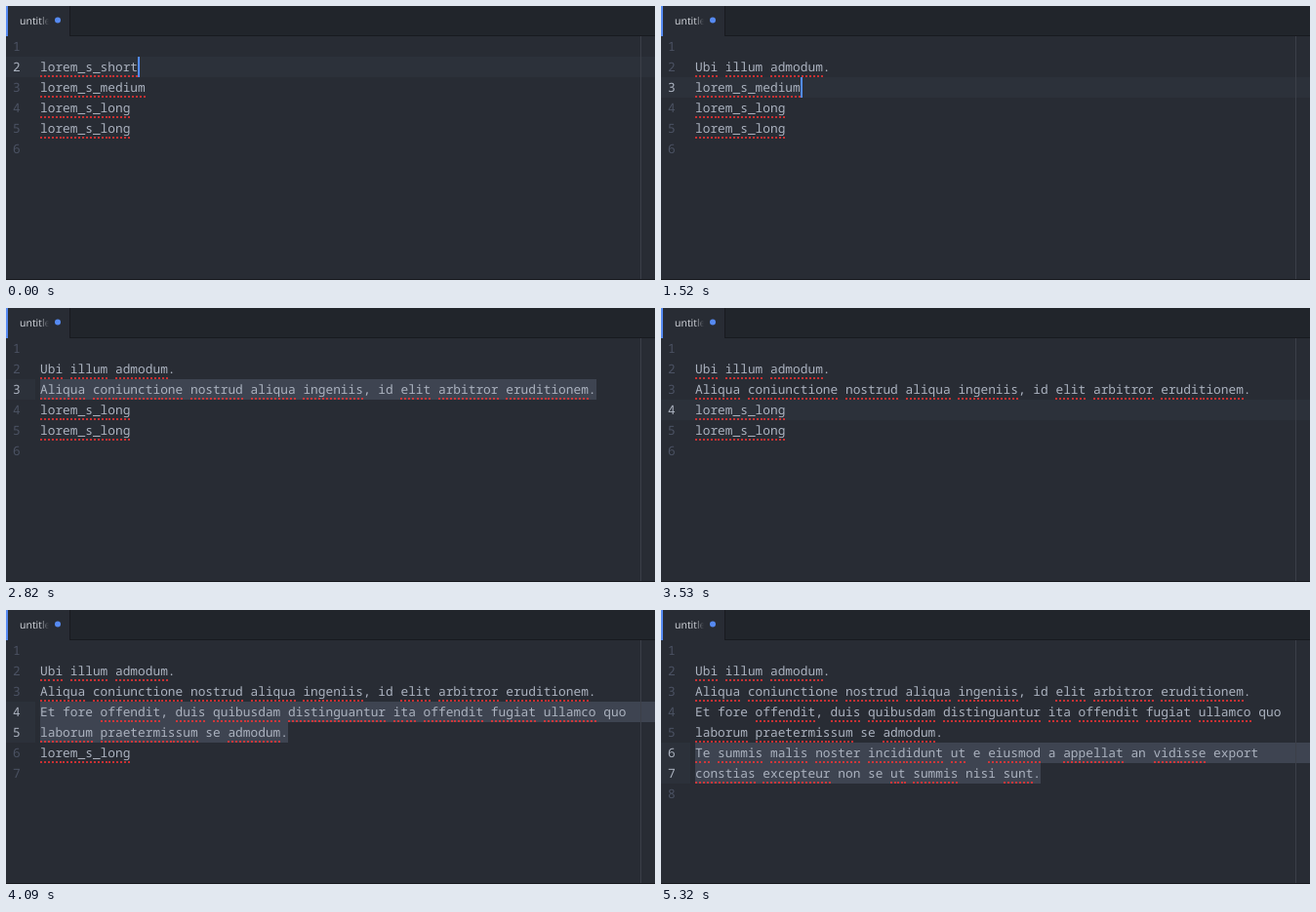
An HTML page with a canvas that plays this animation: 665x281 px, repeating every 7350 ms.

```html
<!DOCTYPE html>
<html lang="en">
<head>
<meta charset="utf-8">
<title>Snippet expansion</title>
<style>
  html, body { margin: 0; width: 100%; height: 100%; overflow: hidden; background: #282c34; }
  canvas { display: block; }
</style>
</head>
<body>
<canvas id="stage" width="665" height="281"></canvas>
<script>
const ctx = document.getElementById('stage').getContext('2d');
const W = 665, H = 281, LOOP = 7350;
const TEXT_X = 35, TOP = 31, ROW = 21, PITCH = 7.697;
const CODE_FONT = '12.83px "Noto Sans Mono", "DejaVu Sans Mono", monospace';
const TAB_FONT = '10.5px "Open Sans", "Noto Sans", sans-serif';

const COLOR = {
  bg: '#282c34', bar: '#21252b', border: '#181a1f', text: '#abb2bf',
  number: '#4b5263', active: '#2c313a', selection: '#3e4451',
  cursor: '#528bff', accent: '#568af2', guide: '#3b3f48',
  typo: 'rgba(255, 51, 51, 0.75)'
};

const KNOWN = new Set('id et fore quo se e a an export non nisi'.split(' '));

// Each snippet gets focus, blinks, expands into selected text, then is spell-checked.
const snippets = [
  { trigger: 'lorem_s_short', focus: 0, off: 380, expand: 840, check: 1250,
    lines: ['Ubi illum admodum.'] },
  { trigger: 'lorem_s_medium', focus: 1520, off: 1920, on: 2390, expand: 2540, check: 2820,
    lines: ['Aliqua coniunctione nostrud aliqua ingeniis, id elit arbitror eruditionem.'] },
  { trigger: 'lorem_s_long', focus: 3120, off: 3530, expand: 3780, check: 4090,
    lines: ['Et fore offendit, duis quibusdam distinguantur ita offendit fugiat ullamco quo',
            'laborum praetermissum se admodum.'] },
  { trigger: 'lorem_s_long', focus: 4370, off: 4800, expand: 5070, check: 5320,
    lines: ['Te summis malis noster incididunt ut e eiusmod a appellat an vidisse export',
            'constias excepteur non se ut summis nisi sunt.'] }
];

const columnX = column => Math.round(TEXT_X + column * PITCH);

function rect(color, x, y, w, h) {
  ctx.fillStyle = color;
  ctx.fillRect(x, y, w, h);
}

function write(text, x, y, color, font = CODE_FONT) {
  ctx.font = font;
  ctx.fillStyle = color;
  ctx.fillText(text, x, y);
}

function buildRows(time) {
  const rows = [{ text: '' }];
  snippets.forEach((snippet, i) => {
    const { trigger, focus, off, on, expand, check, lines } = snippet;
    const next = snippets[i + 1];
    const active = time >= focus && (!next || time < next.focus);
    const expanded = time >= expand;
    const texts = expanded ? lines : [trigger];
    texts.forEach((text, n) => rows.push({
      text, active,
      selected: active && expanded,
      wraps: n < texts.length - 1,
      cursor: active && !expanded && (time < off || time >= on),
      checked: !expanded || time >= check
    }));
  });
  rows.push({ text: '' });
  return rows;
}

function underline(start, end, y) {
  const x = columnX(start), length = columnX(end) - x;
  const count = Math.round((length + 2) / 4);
  const step = (length - 2) / (count - 1);
  for (let i = 0; i < count; i++) {
    rect(COLOR.typo, Math.round(x + i * step), y, 2, 2);
  }
}

function drawRow(row, index) {
  const y = TOP + index * ROW;
  const endX = columnX(row.text.length);
  if (row.active) rect(COLOR.active, 0, y, row.selected ? 30 : W, ROW);
  if (row.selected) rect(COLOR.selection, TEXT_X, y, (row.wraps ? W : endX) - TEXT_X, ROW);

  write(String(index + 1), 7, y + 15, row.active ? COLOR.text : COLOR.number);
  write(row.text, TEXT_X, y + 15, COLOR.text);

  if (row.checked) {
    for (const match of row.text.matchAll(/\w+/g)) {
      const word = match[0];
      if (!KNOWN.has(word.toLowerCase())) {
        underline(match.index, match.index + word.length, y + 19);
      }
    }
  }
  if (row.cursor) rect(COLOR.cursor, endX, y, 2, ROW);
}

function drawTabs() {
  rect(COLOR.bar, 0, 0, W, 30);
  rect(COLOR.border, 66, 30, W - 66, 1);
  rect(COLOR.bg, 0, 0, 65, 31);
  rect(COLOR.border, 65, 0, 1, 31);
  rect(COLOR.accent, 0, 0, 2, 31);

  const fade = ctx.createLinearGradient(34, 0, 44, 0);
  fade.addColorStop(0, '#d7dae0');
  fade.addColorStop(1, 'rgba(215, 218, 224, 0)');
  write('untitled', 14, 19, fade, TAB_FONT);

  ctx.fillStyle = COLOR.accent;
  ctx.beginPath();
  ctx.arc(53, 14.5, 3, 0, Math.PI * 2);
  ctx.fill();
}

function draw(time) {
  rect(COLOR.bg, 0, 0, W, H);
  buildRows(time).forEach(drawRow);
  rect(COLOR.guide, 650, TOP, 1, H - TOP);
  rect(COLOR.border, 0, H - 1, W, 1);
  drawTabs();
}

ctx.textRendering = 'geometricPrecision';
const start = performance.now();
function tick() {
  draw((performance.now() - start) % LOOP);
  requestAnimationFrame(tick);
}
tick();
</script>
</body>
</html>
```
